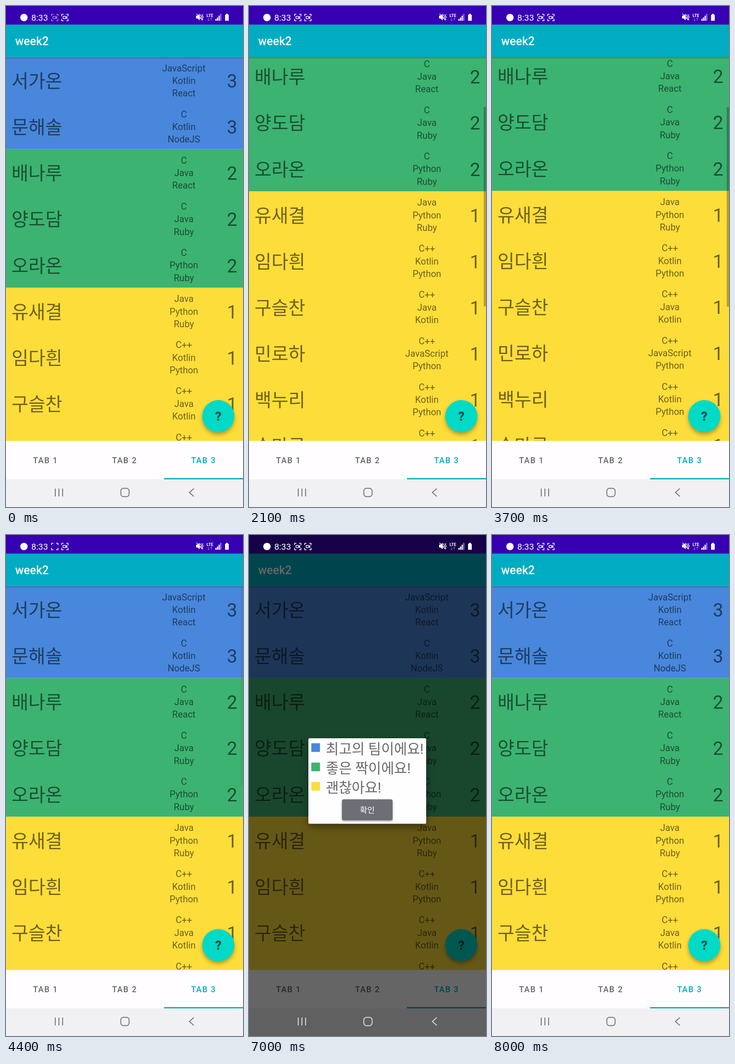
Animation, 515 px wide and 1087 px high, one loop 8100 ms. Source, as an HTML page:

```html
<!DOCTYPE html>
<html lang="ko">
<head>
<meta charset="utf-8">
<style>
html, body { margin: 0; height: 100%; overflow: hidden; background: #f1f0f3; }
svg { display: block; width: 515px; height: 1087px; font-family: Roboto, "Noto Sans CJK KR", "Noto Sans CJK", sans-serif; }
.name, .count { font-size: 40px; }
.lang { font-size: 20px; text-anchor: middle; }
.tab { font-size: 17.5px; font-weight: 500; letter-spacing: 1.56px; text-anchor: middle; }
.line { font-size: 30.6px; fill: #6b6b6b; }
.fab { filter: drop-shadow(0 5px 4px rgba(0,0,0,.3)); }
.card { filter: drop-shadow(0 7px 8px rgba(0,0,0,.38)); }
.button { filter: drop-shadow(0 2px 2px rgba(0,0,0,.35)); }
</style>
</head>
<body>
<svg viewBox="0 0 515 1087">
  <defs>
    <clipPath id="view"><rect y="110" width="515" height="834"/></clipPath>
    <linearGradient id="shade" x2="0" y2="1">
      <stop stop-opacity=".22"/><stop offset="1" stop-opacity="0"/>
    </linearGradient>
    <path id="corners" d="M0 4V0H4M10 0H14V4M14 10V14H10M4 14H0V10" fill="none" stroke="#fff" stroke-width="1.5"/>
    <g id="camera" fill="none" stroke="#fff" stroke-width="1.4"><rect x="3" y="4.5" width="6" height="5" rx="1"/><path d="M9 7L11.5 5V9Z"/></g>
  </defs>

  <g clip-path="url(#view)">
    <g id="list"></g>
    <path id="glow" fill="#077f8f"/>
    <rect id="bar" x="510" width="5" height="432.500" fill-opacity=".27"/>
    <rect y="110.400" width="515" height="5" fill="url(#shade)"/>
  </g>

  <rect width="515" height="41" fill="#3700b3"/>
  <rect y="40.300" width="515" height="70.100" fill="#00acc1"/>
  <text x="20" y="85" font-size="25" font-weight="500" fill="#fff">week2</text>

  <g class="fab"><circle cx="461.4" cy="890" r="35" fill="#00dac6"/></g>
  <text x="461.4" y="899.5" font-size="27" font-weight="900" text-anchor="middle" fill="#10504b">?</text>

  <rect y="943.600" width="515" height="84" fill="#fffdff"/>
  <g id="tabs"></g>
  <rect x="343.3" y="1024.3" width="172" height="2.700" fill="#00acc1"/>
  <rect y="1027" width="515" height="60" fill="#f1f0f3"/>

  <rect id="dim" width="515" height="1087"/>

  <g id="nav" fill="none" stroke-width="2">
    <path d="M107 1047V1064M115 1047V1064M123 1047V1064"/>
    <rect x="249.5" y="1046.5" width="18" height="18" rx="5.5"/>
    <path d="M408 1047L398.500 1055.500L408 1064"/>
  </g>

  <g fill="#fff">
    <circle cx="39" cy="25" r="8"/>
    <text x="55" y="32" font-size="18.8">8:33</text>
    <g id="rec" transform="translate(99 18)"><use href="#corners"/><use id="lens" href="#camera"/></g>
    <g transform="translate(121 18)"><use href="#corners"/><use href="#camera"/></g>
    <path d="M413 21H416L421 17V31L416 27H413Z"/>
    <path d="M414 17L427 31M424 18L423 21L425 24L423 27M428 18L426.500 21L428.500 24L426.500 27L428 30" fill="none" stroke="#fff" stroke-width="1.4"/>
    <text x="443" y="24" font-size="9" font-weight="700" text-anchor="middle">LTE</text>
    <path d="M440 26V32M438 30L440 32L442 30M446 32V26M444 28L446 26L448 28" fill="none" stroke="#fff" stroke-opacity=".5"/>
    <path d="M455 28H457.500V32H455ZM458.500 25H461V32H458.500ZM462 21H464.500V32H462Z"/>
    <path d="M465.500 17H468V32H465.500Z" fill-opacity=".5"/>
    <path d="M478 17H482V19H484V32H476V19H478Z"/>
  </g>

  <g id="popup">
    <rect class="card" x="129" y="441" width="256" height="185.500" rx="2.5" fill="#fefdff"/>
    <g id="legend"></g>
    <rect class="button" x="202" y="573.500" width="110" height="45.500" rx="4" fill="#6e6e76"/>
    <text x="257" y="603" font-size="17.5" font-weight="500" text-anchor="middle" fill="#fff">확인</text>
  </g>
</svg>
<script>
const $ = id => document.getElementById(id);
const TOP = 110.4, BOTTOM = 943.6, VIEW = BOTTOM - TOP, ROW = 100.14;
const colors = { 3: '#4887db', 2: '#3cb371', 1: '#fddd3a' };
const people = `서가온 3 JavaScript Kotlin React
문해솔 3 C Kotlin NodeJS
배나루 2 C Java React
양도담 2 C Java Ruby
오라온 2 C Python Ruby
유새결 1 Java Python Ruby
임다흰 1 C++ Kotlin Python
구슬찬 1 C++ Java Kotlin
민로하 1 C++ JavaScript Python
백누리 1 C++ Kotlin Python
송마루 1 C++ Python React
신아람 1 Java Kotlin Python
안보담 1 C C++ Java
전다온 1 C++ JavaScript Python
차울림 1 C++ NodeJS Python
홍서람 1 C++ JavaScript Python`.split('\n').map(s => s.split(' '));
const LENGTH = people.length * ROW, END = LENGTH - VIEW;

const text = (cls, x, y, s, fill = '') => `<text class="${cls}" x="${x}" y="${y}" ${fill && `fill="${fill}"`}>${s}</text>`;

const band = (n, from, rows) =>
  `<rect y="${TOP + from * ROW}" width="515" height="${rows * ROW}" fill="${colors[n]}"/>`;

$('list').innerHTML = band(3, 0, 2) + band(2, 2, 3) + band(1, 5, 11) +
  '<g fill-opacity=".56">' + people.map(([name, count, ...langs], i) => {
    const y = TOP + i * ROW;
    return text('name', 12, y + 66.6, name) + text('count', 480, y + 66.6, count) +
      langs.map((s, k) => text('lang', 386.5, y + 31.1 + k * 27.3, s)).join('');
  }).join('') + '</g>';

$('tabs').innerHTML = [1, 2, 3].map(n =>
  text('tab', 86 + (n - 1) * 171.7, 992, 'TAB ' + n, n == 3 ? '#00acc1' : '#666')).join('');

$('legend').innerHTML = ['최고의 팀이에요!', '좋은 짝이에요!', '괜찮아요!'].map((s, i) =>
  `<rect x="135.4" y="${451.8 + i * 42}" width="18.8" height="18.8" fill="${colors[3 - i]}"/>` +
  text('line', 167, 474.5 + i * 42, s)).join('');

// Linear interpolation through [time, value] points
function at(t, ...points) {
  let [t0, v0] = points[0];
  for (const [t1, v1] of points) {
    if (t < t1) return t <= t0 ? v0 : v0 + (v1 - v0) * (t - t0) / (t1 - t0);
    [t0, v0] = [t1, v1];
  }
  return v0;
}

function draw(t) {
  const scroll = at(t, [1850, 0], [2000, 95], [2100, 209], [2300, 440], [2500, 610], [2700, 735], [2800, END],
    [3300, END], [3400, 690], [3600, 350], [3800, 70], [3900, 0]);
  $('list').setAttribute('transform', `translate(0 ${-scroll})`);
  $('bar').setAttribute('y', TOP + scroll * VIEW / LENGTH);
  $('bar').setAttribute('opacity', at(t, [1800, 0], [1900, 1], [4200, 1], [4450, 0]));

  const glow = at(t, [2700, 0], [2900, 1], [3500, 0]);
  const peak = BOTTOM - 54.6 * glow, edge = BOTTOM - 16 * glow;
  $('glow').setAttribute('d', `M0 ${BOTTOM}V${edge}Q257.5 ${2 * peak - edge} 515 ${edge}V${BOTTOM}Z`);
  $('glow').setAttribute('opacity', .12 * Math.sqrt(glow));

  const dim = at(t, [4900, 0], [5000, .1], [5200, .42], [5400, .6], [7000, .6], [7400, 0]);
  $('dim').setAttribute('opacity', dim);
  $('popup').setAttribute('opacity', at(t, [5000, 0], [5100, .6], [5200, .96], [5300, 1], [7000, 1], [7200, 0]));
  const gray = 120 + 160 * dim;
  $('nav').setAttribute('stroke', `rgb(${gray},${gray},${gray})`);

  $('rec').setAttribute('opacity', t < 400 ? .55 : 1);
  $('lens').setAttribute('opacity', t >= 4300 && t < 4600 ? 0 : 1);
}

const start = performance.now();
function tick() {
  const t = (performance.now() - start) % 8100;
  draw(Math.floor(t / 100) * 100); // ten pictures a second
  requestAnimationFrame(tick);
}
tick();
</script>
</body>
</html>
```
